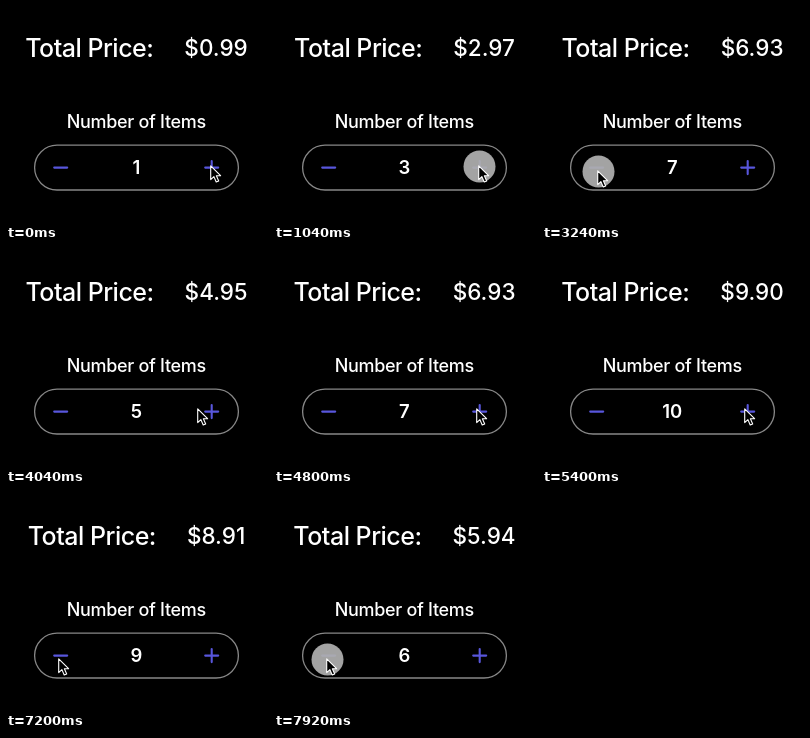
Write an HTML page that moves like this. It is 262x216 px and loops after 8 s.

```html
<!DOCTYPE html>
<html lang="en">
<head>
<meta charset="utf-8">
<title>Stepper</title>
<style>
  html, body { margin: 0; width: 100%; height: 100%; overflow: hidden; background: #000; }
  body { position: relative; color: #fff; font-family: Inter, sans-serif; }
  .total {
    position: absolute; left: 0; top: 22px; width: 261px; height: 40px;
    display: flex; justify-content: center; align-items: center; gap: 31px;
    line-height: 1; white-space: nowrap;
  }
  .total b { font-weight: 500; font-size: 25px; letter-spacing: -.5px; }
  .total span { font-weight: 450; font-size: 22.5px; }
  svg { position: absolute; left: 0; top: 0; display: block; }
  text { fill: #fff; text-anchor: middle; }
</style>
</head>
<body>
<div class="total"><b>Total Price:</b><span id="price">$0.99</span></div>
<svg width="262" height="216" viewBox="0 0 262 216">
  <text x="130.3" y="121.8" font-size="18" font-weight="500" letter-spacing="-.3">Number of Items</text>
  <rect x="28.6" y="139.2" width="203.8" height="44.8" rx="22.4" fill="none" stroke="#888" stroke-width="1.3"/>
  <path d="M48.2 161.6h13M199.2 161.6h13M205.7 155.1v13" stroke="#5856dc" stroke-width="2.1" stroke-linecap="round"/>
  <text id="count" x="130.3" y="168.2" font-size="18.5" font-weight="600">1</text>
  <g id="pointer">
    <circle id="touch" cx=".5" cy="1.5" r="16" fill="#b0b0b0" fill-opacity=".93"/>
    <path d="M-.3 .8V14.6L2.9 11.6L5.2 17L7.7 16L5.4 10.7H9.6Z" fill="#000" stroke="#fff" stroke-width="1.1" stroke-linejoin="round"/>
  </g>
</svg>
<script>
const LOOP = 8000, TICK = 40, HOLD = 100, UNIT = 0.99;
const $ = id => document.getElementById(id);

// Runs of evenly spaced taps; step is the change of count per tap
const runs = [
  { at: 680, taps: 1, every: 0, step: 1 },
  { at: 1040, taps: 6, every: 160, step: 1 },
  { at: 2760, taps: 1, every: 0, step: 0 },
  { at: 3160, taps: 3, every: 200, step: -1 },
  { at: 4520, taps: 5, every: 180, step: 1 },
  { at: 5480, taps: 3, every: 240, step: 0 },
  { at: 6960, taps: 4, every: 320, step: -1 }
];
const taps = runs.flatMap(({ at, taps, every, step }) =>
  Array.from({ length: taps }, (_, i) => ({ at: at + i * every, step })));

// Eased pointer moves, each starting where the last one ended
const home = [205, 158.5];
const moves = [
  { from: 2200, to: 2440, end: [73, 163] },
  { from: 2960, to: 3120, end: [56, 164] },
  { from: 3640, to: 4120, end: [203, 158] },
  { from: 6120, to: 6720, end: [43, 158] },
  { from: 6840, to: 6920, end: [53, 164] }
];

function ease(t, from, to) {
  const k = Math.min(1, Math.max(0, (t - from) / (to - from)));
  return k * k * (3 - 2 * k);
}

const tipAt = t => moves.reduce((tip, { from, to, end }) =>
  tip.map((v, i) => v + (end[i] - v) * ease(t, from, to)), home);

function draw(now) {
  const t = Math.floor(now % LOOP / TICK) * TICK;
  const done = taps.filter(tap => tap.at <= t);
  const count = done.reduce((n, tap) => n + tap.step, 1);
  const [x, y] = tipAt(t);

  $("count").textContent = count;
  $("price").textContent = "$" + (count * UNIT).toFixed(2);
  $("pointer").setAttribute("transform", `translate(${Math.round(x)} ${Math.round(y)})`);
  $("touch").style.display = done.some(tap => t < tap.at + HOLD) ? "" : "none";
}

const start = performance.now();
function frame() {
  draw(performance.now() - start);
  requestAnimationFrame(frame);
}
frame();
</script>
</body>
</html>
```
